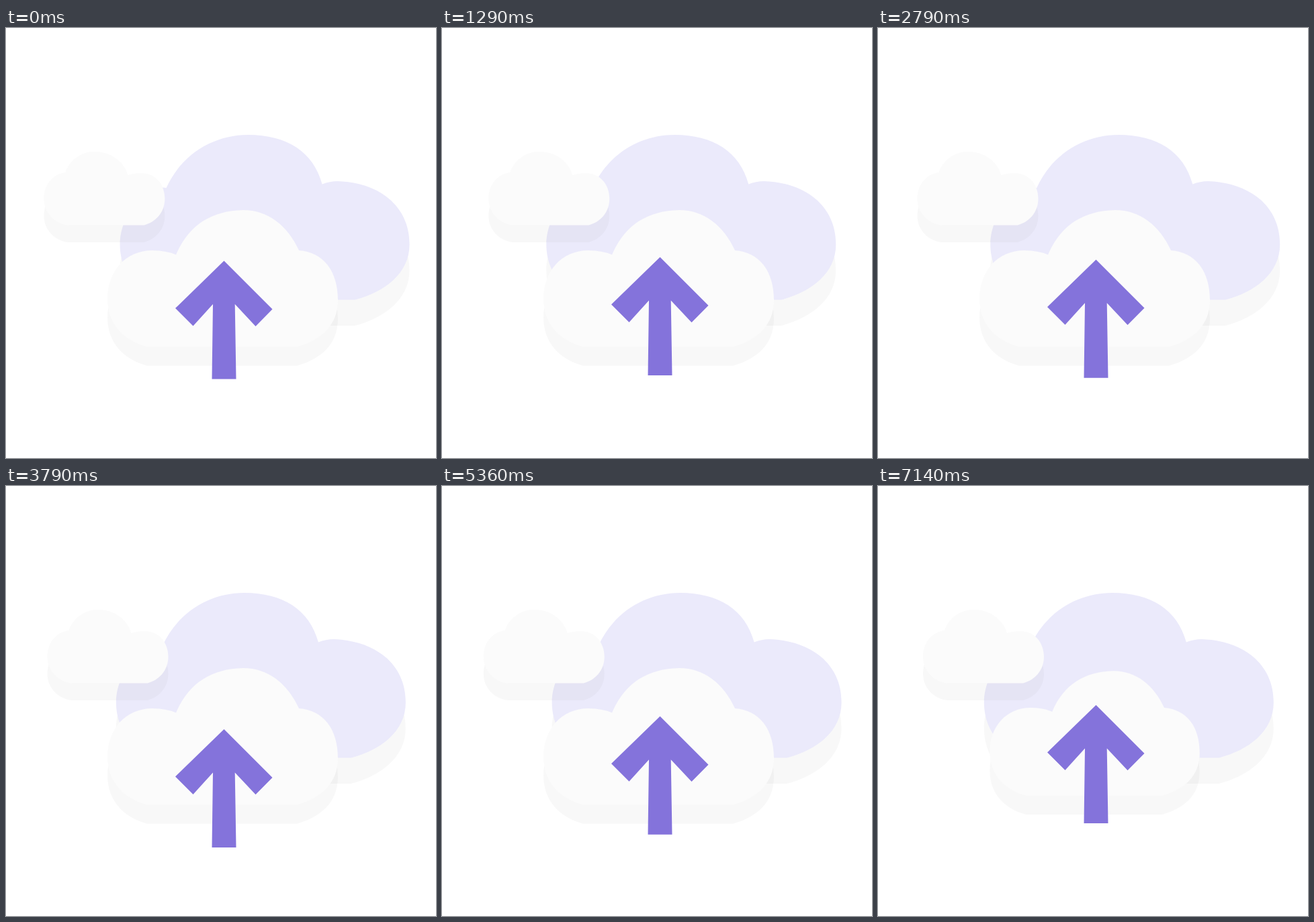
Animation, 640 px wide and 640 px high, one loop 7.21 s. Source, as an HTML page:

```html
<!DOCTYPE html>
<html lang="en">
<head>
<meta charset="utf-8">
<title>Cloud upload</title>
<style>
  html, body { margin: 0; width: 100%; height: 100%; overflow: hidden; background: #fff; }
  svg { display: block; width: 100%; height: 100%; }
  .shadow { fill: #000; opacity: .028; }
  .pale { fill: #fbfbfb; }
</style>
</head>
<body>
<svg viewBox="0 0 640 640">
  <defs>
    <path id="backShape" d="M239 238 C262 187 310 159 361 159 C418 159 458 184 471 232.5 Q482 228 494 228
      C556 230 601 265 601 322 C601 366 563 393 520 404.5 H250 C205 404 170 370 170 322 C170 283 200 239 235 237.5Z"/>
    <path id="smallShape" d="M88 215 C94 197 111 184 132 184 C155 184 175 198 181 219 Q190 216 201 216
      C222 216 236 233 236 254 C236 275 222 289 205 293.5 H92 C72 291 56 275 56 254 C56 233 70 217 88 215Z"/>
    <path id="frontShape" d="M253 337.5 C272 293 306 272 353 271 C390 271 419 294 436 331
      C473 334 494 362 494 405 C494 444 467 465 433 474.5 H210 C175 465 151 440 151 403
      C151 362 178 331 218 331 Q238 331 253 337.5Z"/>
  </defs>
  <g id="back">
    <use href="#backShape" y="38.5" class="shadow"/>
    <use href="#backShape" fill="#ebeafb"/>
  </g>
  <g id="small">
    <use href="#smallShape" y="25.5" class="shadow"/>
    <use href="#smallShape" class="pale"/>
  </g>
  <use id="frontShadow" href="#frontShape" class="shadow"/>
  <use id="front" href="#frontShape" class="pale"/>
  <path id="arrow" fill="#8473db" d="M324.5 -176 L396.5 -104 L371.5 -78.7 L340.7 -111.5 L342.5 0 H306.5 L308 -111.5 L278.5 -79 L252 -105.5Z"/>
</svg>
<script>
const LOOP = 7210;
const LAUNCHES = [880, 3790, 6930];
const WIND_UP = 1100;

// The back cloud swings between two ends, turning at these times.
const swing = [-300, 1850, 3120, 4800, 5750, 7950].map((time, i) => [time, i % 2 ? -19 : 1.5]);

// Timed from each launch: wind up, shoot, rebound, settle.
const arrowBase = [[-WIND_UP, 519.5], [-100, 538], [0, 538], [210, 502], [400, 517], [850, 515], [1800, 519.5]];
const cloudScale = [[0, 1], [250, .9], [410, 1]];

// Halfway between linear and sine easing.
const ease = u => (u + (1 - Math.cos(Math.PI * u)) / 2) / 2;

function glide(stops, t) {
  const next = stops.findIndex(([time]) => time > t);
  if (next < 1) return stops.at(next)[1];
  const [fromTime, from] = stops[next - 1], [toTime, to] = stops[next];
  return from + (to - from) * ease((t - fromTime) / (toTime - fromTime));
}

const place = (id, transform) => document.getElementById(id).setAttribute("transform", transform);

function draw(t) {
  const sinceLaunch = t - LAUNCHES.findLast(launch => t >= launch - WIND_UP);
  const shift = glide(swing, t);
  const shrink = `scale(${glide(cloudScale, sinceLaunch)}) translate(-323 -320)`;

  place("back", `translate(${shift})`);
  place("small", `translate(${-.9 * shift})`);
  place("front", `translate(323 320) ${shrink}`);
  place("frontShadow", `translate(323 348.3) ${shrink}`);
  place("arrow", `translate(0 ${glide(arrowBase, sinceLaunch)})`);
}

const start = performance.now();
function tick() {
  draw((performance.now() - start) % LOOP);
  requestAnimationFrame(tick);
}
tick();
</script>
</body>
</html>
```
